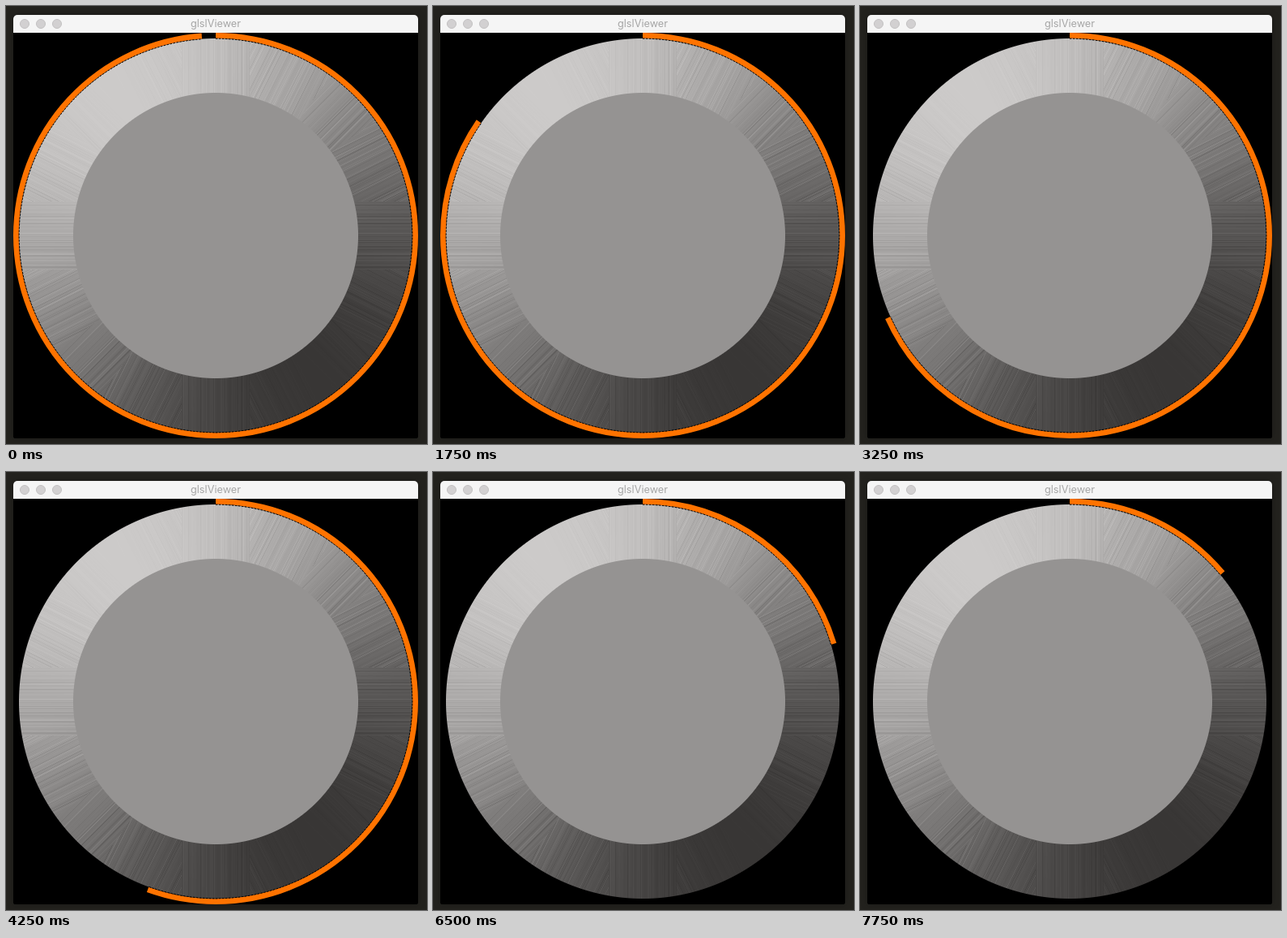
Recreate the animation shown at these times as an HTML page with a canvas. Size 520 by 540 pixels, loop 8 s.

```html
<!DOCTYPE html>
<html lang="en">
<head>
<meta charset="utf-8">
<title>Dial</title>
<style>
  html, body { margin: 0; width: 100%; height: 100%; overflow: hidden; background: #23221e; }
  .window {
    position: absolute; left: 9px; top: 11px; width: 500px; height: 522px;
    border-radius: 5px 5px 3px 3px; overflow: hidden; background: #000;
    box-shadow: 0 0 8px rgba(0, 0, 0, .25);
  }
  .bar {
    position: relative; height: 22px; background: #f5f5f5;
    font: 12.7px/22px Inter, sans-serif; color: #a6a6a6; text-align: center;
  }
  .bar i {
    position: absolute; top: 5px; width: 12px; height: 12px; border-radius: 50%;
    box-sizing: border-box; background: #d2d0d1; border: 1px solid #c2c0c1;
  }
  canvas { display: block; }
</style>
</head>
<body>
<div class="window">
  <div class="bar">
    <i style="left:8px"></i><i style="left:28px"></i><i style="left:48px"></i>
    glslViewer
  </div>
  <canvas width="500" height="500"></canvas>
</div>
<script>
const ctx = document.querySelector('canvas').getContext('2d');
const SIZE = 500, C = SIZE / 2, RING = 243, DISC = 176;
const LOOP = 8000, STEP = 250;
const rad = deg => deg * Math.PI / 180;
const clamp01 = v => Math.min(1, Math.max(0, v));

// Repeatable noise in -1..1
const noise = n => {
  const v = Math.sin(n * 12.9898) * 43758.5453;
  return (v - Math.floor(v)) * 2 - 1;
};

// Direction of the brushed streaks at an offset from the centre
function grain(x, y) {
  const ax = Math.abs(x), ay = Math.abs(y);
  if (ax < 42) return [0, 1];
  if (ay < 42) return [1, 0];
  const k = ax / ay;
  const [u, v] = k < .72 ? [1, 2] : k > 1.39 ? [2, 1] : [1, 1];
  return [u * Math.sign(x), v * Math.sign(y)];
}

function ringTone(x, y) {
  const light = Math.atan2(x, -y) - rad(325);
  const [u, v] = grain(x, y);
  const line = Math.round((x * v - y * u) / Math.hypot(u, v));
  const streak = noise(line + 500 * (u * 3 + v)) ** 3;
  return 128 + 74 * Math.cos(light) + 13 * streak * Math.abs(Math.sin(light));
}

function makeDial() {
  const img = ctx.createImageData(SIZE, SIZE);
  for (let i = 0; i < SIZE * SIZE; i++) {
    const x = i % SIZE + .5 - C, y = Math.floor(i / SIZE) + .5 - C;
    const r = Math.hypot(x, y);
    const disc = clamp01(DISC + .5 - r), cover = clamp01(RING + .5 - r);
    const tone = r < RING + 1 ? (ringTone(x, y) * (1 - disc) + 147 * disc) * cover : 0;
    img.data.set([tone + 2 * cover, tone, tone - cover, 255], i * 4);
  }
  return img;
}

// [seconds, degrees] of the orange sweep
const sweep = [
  [0, 356], [.75, 336.3], [1.75, 304.8], [2.5, 277.3], [3.25, 245.7],
  [3.75, 223.2], [4.25, 199.9], [5, 162], [5.25, 148.8], [5.75, 120.2],
  [6.5, 73.2], [7, 39], [7.5, 1], [7.75, 50]
];

function sweepAt(s) {
  const next = sweep.findIndex(key => key[0] >= s);
  if (next < 1) return sweep[0][1];
  const [t0, a0] = sweep[next - 1], [t1, a1] = sweep[next];
  return a0 + (a1 - a0) * (s - t0) / (t1 - t0);
}

function arc(radius, width, color, degrees, dash = []) {
  ctx.beginPath();
  ctx.arc(C, C, radius, rad(-90), rad(degrees - 90));
  ctx.lineWidth = width;
  ctx.strokeStyle = color;
  ctx.setLineDash(dash);
  ctx.stroke();
}

const dial = makeDial();

function draw() {
  const t = Math.floor(performance.now() % LOOP / STEP) * STEP;
  const degrees = sweepAt(t / 1000);
  ctx.putImageData(dial, 0, 0);
  arc(246.6, 6.8, '#ff7300', degrees);
  arc(242.8, 1, '#000', degrees, [2.5, 1.5]);
  requestAnimationFrame(draw);
}
draw();
</script>
</body>
</html>
```
